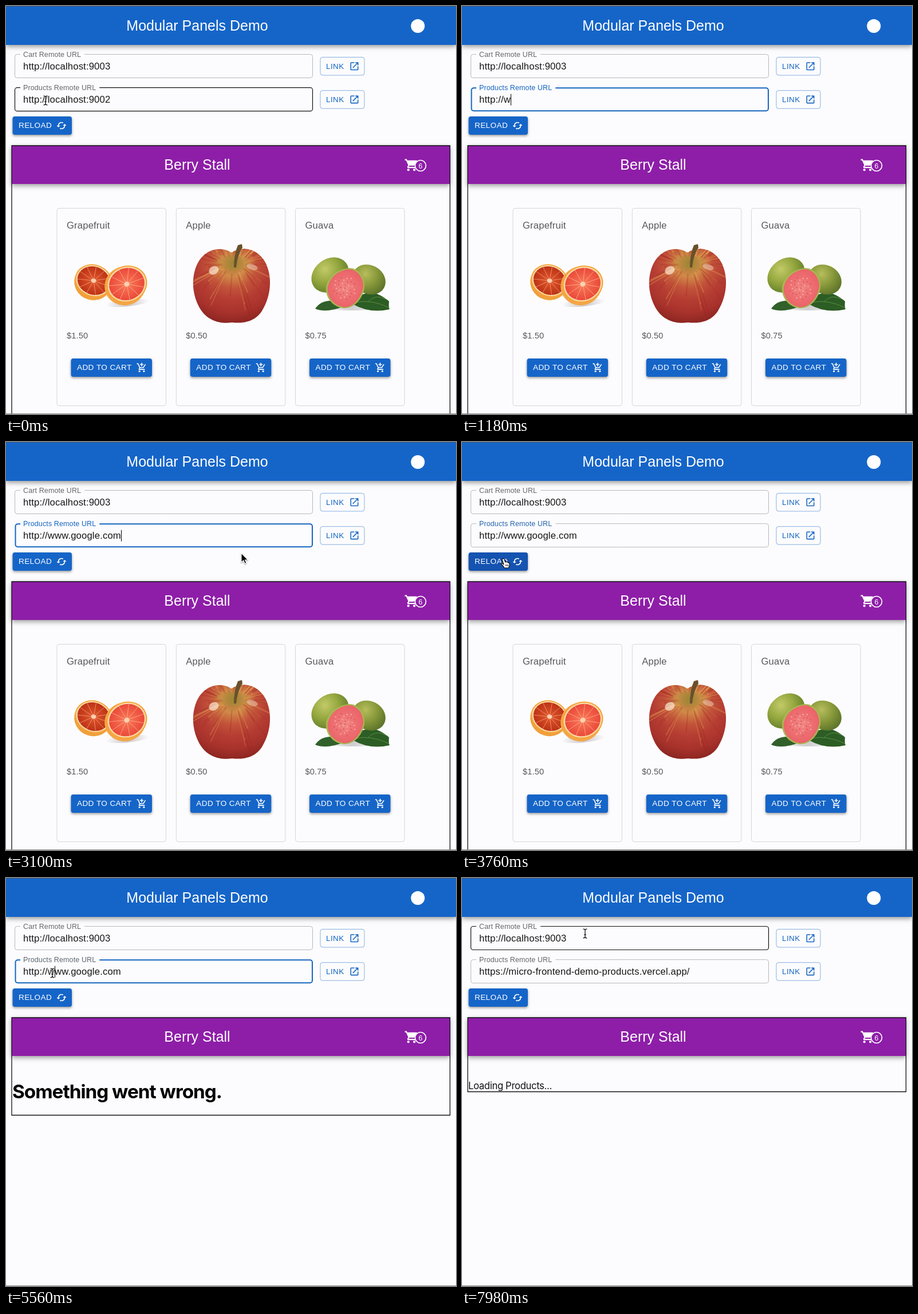
An HTML page with a canvas that plays this animation: 786x713 px, repeating every 8 s.

```html
<!DOCTYPE html>
<html lang="en">
<head>
<meta charset="utf-8">
<title>Modular Panels Demo</title>
<style>
html, body { margin: 0; width: 100%; height: 100%; overflow: hidden; background: #fcfcfe; }
canvas { display: block; }
</style>
</head>
<body>
<canvas id="stage" width="786" height="713"></canvas>
<script>
const ctx = document.getElementById('stage').getContext('2d');
const LOOP = 8000;
const SANS = '"Liberation Sans", Arial, sans-serif';
const UI = 'Inter, sans-serif';
const BG = '#fcfcfe', BLUE = '#1565c8', BLUE_HOVER = '#1453b0', PURPLE = '#8e1ea8';
const GREY = [102, 102, 104], FOCUS = [21, 101, 192];
const BASE = 'http://', OLD_HOST = 'localhost:9002', NEW_HOST = 'www.google.com';
const PASTED = 'https://micro-frontend-demo-products.vercel.app/';

// Times of the user's actions, in ms
const T = { click: 260, drag: 400, dragEnd: 760, type: 1160, key: 115, reload: 3720, fail: 3800,
  refocus: 5540, selectAll: 5900, paste: 6200, reload2: 7380, loading: 7480 };

// Pointer stops: time, x, y
const STOPS = [[0, 69, 165], [150, 73, 165], [T.drag, 73, 165], [T.dragEnd, 192, 165], [2750, 192, 165],
  [3040, 411, 194], [3120, 411, 194], [3560, 72, 204], [3800, 72, 204], [4220, 184, 163],
  [4500, 184, 163], [5300, 81, 166], [6300, 81, 166], [6720, 72, 202], [7420, 72, 202], [7940, 215, 97]];

const clamp = v => Math.max(0, Math.min(1, v));
const smooth = v => v * v * (3 - 2 * v);

function pointerAt(t) {
  let i = 0;
  while (i < STOPS.length - 2 && t >= STOPS[i + 1][0]) i++;
  const [a, ax, ay] = STOPS[i], [b, bx, by] = STOPS[i + 1];
  const k = smooth(clamp((t - a) / (b - a)));
  return { x: ax + (bx - ax) * k, y: ay + (by - ay) * k, shown: t < T.type || t >= 2750 };
}

function text(str, x, y, size, color, o = {}) {
  ctx.font = `${o.weight || 400} ${size}px ${o.font || SANS}`;
  ctx.letterSpacing = (o.spacing || 0) + 'px';
  ctx.textAlign = o.align || 'left';
  ctx.fillStyle = color;
  ctx.fillText(str, x, y);
}

function fillBox(x, y, w, h, r, color) {
  ctx.fillStyle = color;
  ctx.beginPath();
  ctx.roundRect(x, y, w, h, r);
  ctx.fill();
}

function strokeBox(x, y, w, h, r, color, width = 1) {
  ctx.strokeStyle = color;
  ctx.lineWidth = width;
  ctx.beginPath();
  ctx.roundRect(x, y, w, h, r);
  ctx.stroke();
}

function shadowed(draw, blur, dy, alpha) {
  ctx.save();
  ctx.shadowColor = `rgba(0,0,0,${alpha})`;
  ctx.shadowBlur = blur;
  ctx.shadowOffsetY = dy;
  draw();
  ctx.restore();
}

function oval(x, y, rx, ry, turn, fill) {
  ctx.fillStyle = fill;
  ctx.beginPath();
  ctx.ellipse(x, y, rx, ry, turn, 0, 7);
  ctx.fill();
}

function path(d, fill, stroke, width) {
  const p = new Path2D(d);
  if (fill) { ctx.fillStyle = fill; ctx.fill(p); }
  if (stroke) { ctx.strokeStyle = stroke; ctx.lineWidth = width; ctx.stroke(p); }
}

function radial(x, y, r, ...stops) {
  const g = ctx.createRadialGradient(x, y, 0, x, y, r);
  stops.forEach((c, i) => g.addColorStop(i / (stops.length - 1), c));
  return g;
}

// Icons live in a 24-unit box centred on x, y
function icon(draw, x, y, scale, color) {
  ctx.save();
  ctx.translate(x, y);
  ctx.scale(scale, scale);
  ctx.translate(-12, -12);
  draw(color);
  ctx.restore();
}

function openIcon(c) {
  path('M12 4H5Q4 4 4 5V19Q4 20 5 20H19Q20 20 20 19V12M14 4H20V10M20 4L8.5 15.5', null, c, 2);
}

function reloadIcon(c) {
  path('M8.5 18.1A7 7 0 0 0 19 12M15.5 5.9A7 7 0 0 0 5 12', null, c, 2);
  path('M15 12L19 8L23 12ZM1 12L5 16L9 12Z', c);
}

function cartBase(c) {
  oval(7, 20, 2, 2, 0, c);
  oval(17, 20, 2, 2, 0, c);
  path('M1 3H3.6L7.9 12.1L6.2 15.2Q6 16 7 16H19', null, c, 2);
}

function cartIcon(c) {
  cartBase(c);
  path('M5.2 4H20.7Q22.2 4.2 21.6 5.5L17.4 12.2Q17 13 15.6 13H8.5Z', c);
}

function addCartIcon(c) {
  cartBase(c);
  path('M7.9 12H15.6L20.4 4.4M8 5H16M12 1V9', null, c, 2);
}

function button(x, y, w, label, draw, hover) {
  shadowed(() => fillBox(x, y, w, 32, 4, hover ? BLUE_HOVER : BLUE), 4, 2, 0.4);
  text(label, x + 10.5, y + 20.2, 13.55, '#fff', { spacing: 0.39 });
  icon(draw, x + w - 18, y + 16, 0.78, '#fff');
}

function linkButton(y) {
  strokeBox(549, y, 77, 31.5, 4, 'rgba(21,101,192,.5)');
  text('LINK', 559, y + 20, 13.55, '#1565c0', { spacing: 0.39 });
  icon(openIcon, 608.5, y + 15.7, 0.78, '#1565c0');
}

function appBar(x, y, w, h, color, title, baseline) {
  shadowed(() => { ctx.fillStyle = color; ctx.fillRect(x, y, w, h); }, 8, 3, 0.4);
  text(title, 334, baseline, 25, '#fff', { align: 'center' });
}

const INPUT = { spacing: 0.156 };
const inputWidth = str => {
  ctx.font = `16.67px ${SANS}`;
  ctx.letterSpacing = INPUT.spacing + 'px';
  return ctx.measureText(str).width;
};

function field(y, label, value, o = {}) {
  const border = o.focused ? '#1565c0' : o.hover ? '#111' : '#b8b8bb';
  if (o.focused) strokeBox(16.5, y + 0.5, 518.5, 40, 4, border, 2);
  else strokeBox(15.5, y, 520, 41, 4, border, o.hover ? 1.2 : 1);
  const mix = clamp(o.blend || 0);
  const tint = GREY.map((c, i) => Math.round(c + (FOCUS[i] - c) * mix));
  ctx.font = `12.5px ${SANS}`;
  ctx.letterSpacing = '0.117px';
  ctx.fillStyle = BG;
  ctx.fillRect(25, y - 2, ctx.measureText(label).width + 11, 5);
  text(label, 30, y + 4.3, 12.5, `rgb(${tint})`, { spacing: 0.117 });
  if (o.select) {
    const a = 30 + inputWidth(value.slice(0, o.select[0]));
    const b = 30 + inputWidth(value.slice(0, o.select[1]));
    ctx.fillStyle = '#b3d7ff';
    ctx.fillRect(a, y + 11, b - a, 20);
  }
  text(value, 30, y + 26.5, 16.67, '#161616', INPUT);
  if (o.caret >= 0) {
    ctx.fillStyle = '#000';
    ctx.fillRect(Math.round(30 + inputWidth(value.slice(0, o.caret))), y + 11, 1, 20);
  }
}

const blink = (t, since) => (t - since) % 1000 < 500;

function productsInput(t) {
  const s = { value: BASE + OLD_HOST, focused: false, caret: -1, blend: 0 };
  const n = BASE.length;
  if (t >= T.type) {
    const typed = Math.min(NEW_HOST.length, 1 + Math.floor((t - T.type) / T.key));
    s.value = BASE + NEW_HOST.slice(0, typed);
    const last = T.type + (typed - 1) * T.key;
    if (t < T.reload && blink(t, last)) s.caret = s.value.length;
  } else if (t >= T.drag) {
    const chars = Math.round(OLD_HOST.length * smooth(clamp((t - T.drag) / (T.dragEnd - T.drag))));
    if (chars) s.select = [n, n + chars];
  } else if (t >= T.click) s.caret = n;

  if (t >= T.paste) {
    s.value = PASTED;
    s.caret = t < T.reload2 && blink(t, T.paste) ? PASTED.length : -1;
  } else if (t >= T.selectAll) s.select = [0, s.value.length];
  else if (t >= T.refocus && blink(t, T.refocus)) s.caret = n + 1;

  for (const [from, to] of [[T.click, T.reload], [T.refocus, T.reload2]]) {
    if (t >= from && t < to) s.focused = true;
    if (t >= from) s.blend = clamp((t - from) / 200) - clamp((t - to) / 200);
  }
  return s;
}

function citrusFace(x, y, rx, ry, turn, inner, outer) {
  ctx.save();
  ctx.translate(x, y);
  ctx.rotate(turn);
  ctx.scale(rx, ry);
  oval(0, 0, 1, 1, 0, '#f6a43a');
  oval(0, 0, 0.94, 0.94, 0, '#fbd9a4');
  oval(0, 0, 0.87, 0.87, 0, radial(0, 0, 0.87, inner, outer));
  ctx.strokeStyle = 'rgba(255,205,170,.65)';
  ctx.lineWidth = 0.025;
  for (let i = 0; i < 11; i++) {
    const a = i * Math.PI * 2 / 11;
    ctx.beginPath();
    ctx.moveTo(0, 0);
    ctx.lineTo(0.86 * Math.cos(a), 0.86 * Math.sin(a));
    ctx.stroke();
  }
  oval(0, 0, 0.13, 0.13, 0, '#fbd0b0');
  ctx.restore();
}

function grapefruit() {
  oval(212, 519, 38, 6, -0.1, radial(212, 519, 38, 'rgba(90,70,70,.3)', 'rgba(90,70,70,0)'));
  oval(152, 483, 33, 31, 0.3, '#f0a03c');
  citrusFace(153, 480, 33, 28, 0.35, '#e2582c', '#bd3316');
  oval(208, 489, 36, 34, -0.3, '#f3a648');
  citrusFace(211, 486, 36, 32, -0.35, '#fa7a58', '#ea4a3a');
}

function apple() {
  const body = 'M394 431C412 418 440 424 453 448C466 474 463 507 447 533C434 553 412 555 395 553'
    + 'C376 556 354 551 341 532C325 508 322 474 335 449C347 426 374 418 394 431Z';
  const fill = radial(396, 452, 105, '#a97a35', '#d08a48', '#c2523a', '#b43c32', '#a8322c', '#8a2420');
  path(body, fill);
  ctx.save();
  ctx.clip(new Path2D(body));
  let seed = 7;
  const rnd = () => (seed = seed * 16807 % 2147483647) / 2147483647;
  for (let i = 0; i < 80; i++) {
    const a = rnd() * Math.PI * 2, r = 18 + rnd() * 25, len = 20 + rnd() * 45;
    ctx.strokeStyle = i % 3 ? 'rgba(150,25,25,.22)' : 'rgba(240,185,95,.28)';
    ctx.lineWidth = 1 + rnd() * 2;
    ctx.beginPath();
    ctx.moveTo(397 + r * Math.cos(a), 452 + r * 0.7 * Math.sin(a));
    ctx.lineTo(397 + (r + len) * Math.cos(a), 455 + (r + len) * Math.sin(a));
    ctx.stroke();
  }
  oval(398, 449, 34, 12, 0, radial(398, 449, 34, '#9b8434', 'rgba(202,150,70,0)'));
  oval(363, 462, 9, 7, -0.5, 'rgba(255,240,220,.65)');
  oval(430, 456, 10, 5, 0.3, 'rgba(255,240,220,.4)');
  ctx.restore();
  path('M398 457Q398 434 405 418L412 416L413 422Q404 436 402 457Z', '#69502c');
}

function guava() {
  oval(604, 525, 55, 7, 0, radial(604, 525, 55, 'rgba(60,60,60,.25)', 'rgba(60,60,60,0)'));
  path('M612 512Q636 488 669 516Q668 526 670 530Q635 538 606 521Z', '#2c5d24');
  path('M608 518Q638 512 669 527M632 517Q645 502 665 513', null, '#5c8c42', 1);
  path('M570 515Q550 514 540 529Q560 537 590 525Z', '#31602a');
  oval(566, 470, 35, 28, -0.65, radial(557, 460, 46, '#c2ca68', '#96a840', '#5f7b28'));
  oval(634, 478, 30, 25, 0.5, radial(628, 468, 42, '#b7bd5c', '#87983a', '#586f28'));
  path('M599 458C616 457 628 475 626 493C622 516 604 530 588 528C569 525 557 508 559 490C564 470 580 460 599 458Z', '#a9b551');
  path('M598 460C614 460 625 476 624 492C619 514 604 528 589 526C571 523 560 507 562 491C567 472 582 462 598 460Z',
    radial(592, 493, 36, '#f18a86', '#ee7072', '#e96066'));
  for (let i = 0; i < 34; i++) {
    const a = i * 2.4, r = 3.6 * Math.sqrt(i);
    oval(592 + r * Math.cos(a), 493 + r * Math.sin(a), 1.3, 1, a, i % 2 ? '#f7b3a4' : '#d9545a');
  }
}

function card(x, name, price, draw) {
  strokeBox(x, 353.5, 190.5, 345, 4, '#d6d6d9');
  text(name, x + 17, 389, 16.67, '#58585a', INPUT);
  draw();
  text(price, x + 17, 580.5, 14.58, '#58585a', INPUT);
  button(x + 24.5, 616, 141.5, 'ADD TO CART', addCartIcon);
}

function store(t) {
  const bottom = t < T.fail ? 730 : t < T.loading ? 414.5 : 373.5;
  appBar(10, 244, 765, 67, PURPLE, 'Berry Stall', 286);
  icon(cartIcon, 708, 278, 1.04, '#fff');
  oval(724, 279, 10, 10, 0, PURPLE);
  ctx.strokeStyle = '#fff';
  ctx.lineWidth = 1.7;
  ctx.beginPath();
  ctx.arc(724, 279, 9.5, 0, 7);
  ctx.stroke();
  text('6', 724, 283.5, 12.5, '#fff', { align: 'center' });

  if (t < T.fail) {
    card(89, 'Grapefruit', '$1.50', grapefruit);
    card(297.3, 'Apple', '$0.50', apple);
    card(505.5, 'Guava', '$0.75', guava);
  } else if (t < T.loading) {
    text('Something went wrong.', 11, 385, 33.3, '#000', { font: UI, weight: 700, spacing: -1 });
  } else {
    text('Loading Products...', 11, 369, 16.67, '#111', { font: UI, spacing: -0.35 });
  }
  strokeBox(10, 244, 765.5, bottom - 244, 0, '#111', 1.3);
}

function pointer(p, kind) {
  ctx.save();
  ctx.translate(p.x, p.y);
  ctx.lineJoin = 'round';
  if (kind === 'beam') {
    const d = 'M-3.5 -8Q-.5 -8 0 -6Q.5 -8 3.5 -8M0 -6V6M-3.5 8Q-.5 8 0 6Q.5 8 3.5 8M-2 2H2';
    path(d, null, 'rgba(255,255,255,.8)', 3);
    path(d, null, '#000', 1.2);
  } else if (kind === 'hand') {
    path('M-1 0Q1 -1 2 1L3.5 6Q5 4.5 6 6Q8 5 8.5 7Q10.5 6.5 11 9L11 12Q10 14 9.5 16H2Q0 12 -4 9Q-4 7 -1 8.5L1 10L-1.8 2Q-2 .5 -1 0Z',
      '#fff', '#000', 1.1);
    path('M4.5 10V13M6.5 10V13M8.5 10V13', null, '#000', 0.8);
  } else {
    shadowed(() => path('M0 0V16.5L3.8 13L6.3 18.6L9 17.4L6.6 12H11.7Z', '#000', '#fff', 1.2), 2, 1, 0.35);
  }
  ctx.restore();
}

function draw(t) {
  const p = pointerAt(t);
  const over = (x, y, w, h) => p.shown && p.x >= x && p.x <= x + w && p.y >= y && p.y <= y + h;
  const onCart = over(15, 84, 521, 42), onProducts = over(15, 142, 521, 42), onReload = over(11, 193, 104, 32);
  ctx.fillStyle = BG;
  ctx.fillRect(0, 0, 786, 713);

  appBar(0, 0, 786, 68, BLUE, 'Modular Panels Demo', 43);
  oval(719.3, 35, 12, 12, 0, '#fff');
  ctx.fillStyle = '#3c5878';
  ctx.fillRect(0, 0, 786, 1);

  field(84.5, 'Cart Remote URL', 'http://localhost:9003', { hover: onCart });
  const input = productsInput(t);
  field(142.7, 'Products Remote URL', input.value, { ...input, hover: onProducts });
  linkButton(89.5);
  linkButton(147.7);
  button(11.5, 193, 103.5, 'RELOAD', reloadIcon, onReload);
  store(t);

  ctx.fillStyle = '#8c8c90';
  ctx.fillRect(0, 712, 786, 1);
  if (p.shown) pointer(p, onCart || onProducts ? 'beam' : onReload ? 'hand' : 'arrow');
}

const start = performance.now();
function tick() {
  draw((performance.now() - start) % LOOP);
  requestAnimationFrame(tick);
}
tick();
</script>
</body>
</html>
```
